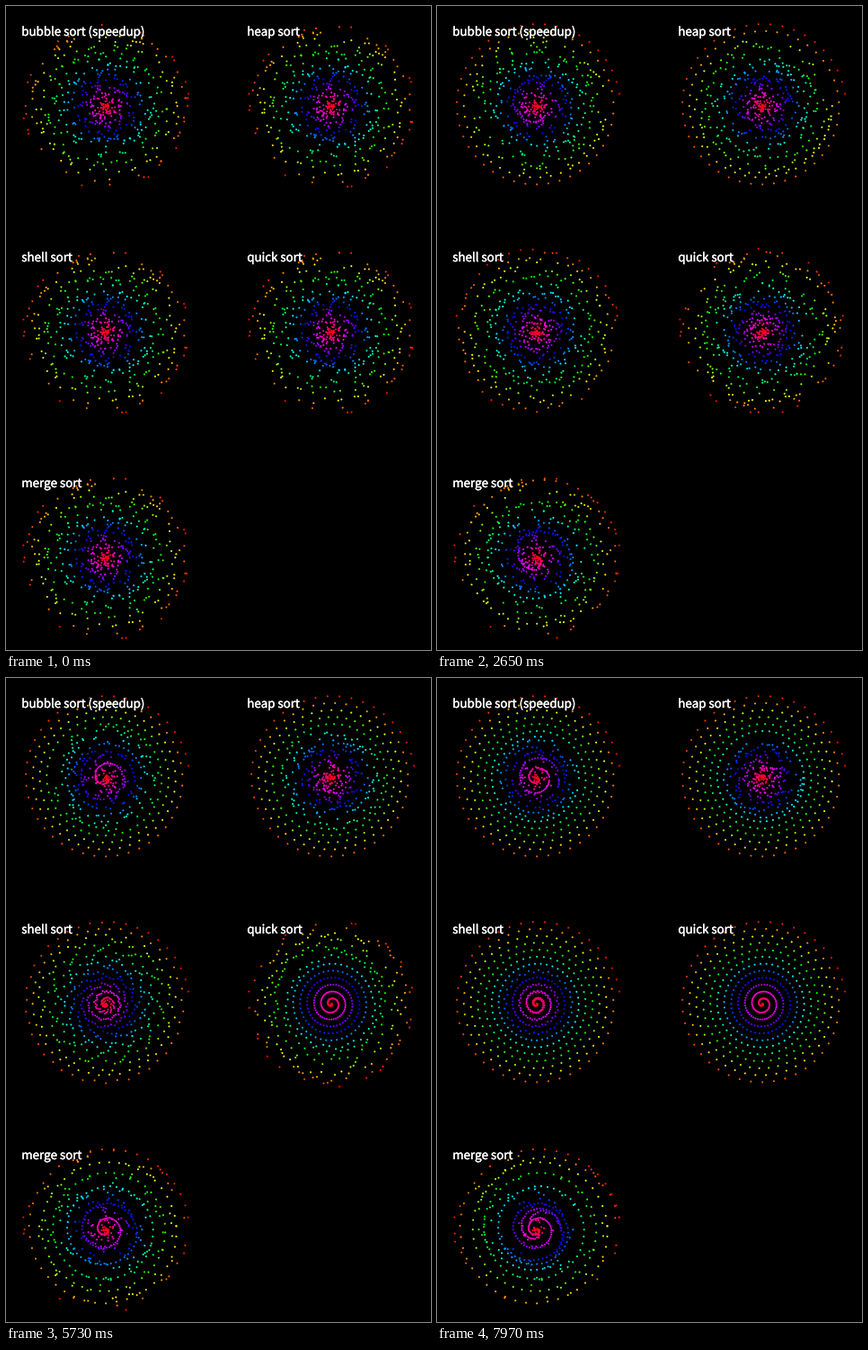
Write a matplotlib script that moves like this. It is 473 px wide and 716 px high and loops after 8000 ms.

```python
import math
import random

import matplotlib.patheffects as pe
import matplotlib.pyplot as plt
import numpy as np
from matplotlib.animation import FuncAnimation
from matplotlib.colors import hsv_to_rgb

W, H, DPI = 473, 716, 100
FRAMES, INTERVAL = 200, 40
STEPS = 113                # picture changes in one loop
N, TURNS = 512, 12
RADIUS = 93
SMALL = 20                 # quick sort finishes shorter runs at once


def bubble(a):
    for end in range(N - 1, 0, -1):
        for j in range(end):
            if a[j] > a[j + 1]:
                a[j], a[j + 1] = a[j + 1], a[j]
        yield


def heap(a):
    def sift(i, n):
        while 2 * i + 1 < n:
            c = 2 * i + 1
            if c + 1 < n and a[c + 1] > a[c]:
                c += 1
            if a[i] >= a[c]:
                return
            a[i], a[c] = a[c], a[i]
            i = c

    for i in range(N // 2 - 1, -1, -1):
        sift(i, N)
    for end in range(N - 1, 0, -1):
        a[0], a[end] = a[end], a[0]
        sift(0, end)
        yield


def shell(a):
    gap = N // 2
    while gap:
        for start in range(N - gap - 1, -1, -1):
            i = start
            yield
            while i + gap < N and a[i] > a[i + gap]:
                a[i], a[i + gap] = a[i + gap], a[i]
                i += gap
                yield
        gap //= 2


def quick(a, lo=0, hi=N - 1):
    if hi - lo < SMALL:
        a[lo:hi + 1] = sorted(a[lo:hi + 1])
        yield
        return
    pivot = (lo + hi) // 2     # values are ranks, so this is the median
    i, j = lo, hi
    while i <= j:
        while a[i] < pivot:
            i += 1
            yield
        while a[j] > pivot:
            j -= 1
            yield
        if i <= j:
            a[i], a[j] = a[j], a[i]
            i, j = i + 1, j - 1
            yield
    yield from quick(a, lo, j)
    yield from quick(a, i, hi)


def merge(a, lo=0, hi=N):
    if hi - lo < 2:
        return
    mid = (lo + hi) // 2
    yield from merge(a, lo, mid)
    yield from merge(a, mid, hi)
    for k, v in enumerate(sorted(a[lo:hi]), lo):
        a[k] = v
        yield


def record(sort, first, last):
    """States of one sort, from the first to the last fraction of its work."""
    a = list(shuffled)
    states = [np.array(a)]
    for _ in sort(a):
        states.append(np.array(a))
    states.append(np.array(a))
    top = len(states) - 1
    picks = np.linspace(first, last, STEPS + 1) * top
    return [states[min(top, int(p))] for p in picks]


random.seed(12)
shuffled = list(range(N))
random.shuffle(shuffled)

# title, sort, column, row, fraction of the work at the start and the end
PANELS = [
    ("bubble sort (speedup)", bubble, 0, 0, 0.005, 0.50),
    ("heap sort", heap, 1, 0, 0.0, 0.52),
    ("shell sort", shell, 0, 1, 0.0, 0.945),
    ("quick sort", quick, 1, 1, 0.0, 1.08),
    ("merge sort", merge, 0, 2, 0.0, 0.63),
]

fig = plt.figure(figsize=(W / DPI, H / DPI), dpi=DPI, facecolor="black")
ax = fig.add_axes([0, 0, 1, 1])
ax.set_xlim(0, W)
ax.set_ylim(H, 0)
ax.axis("off")

angle = np.arange(N) * 2 * math.pi * TURNS / N
ray = np.column_stack([np.cos(angle), np.sin(angle)])
hue = 1 - np.arange(N) / N
palette = hsv_to_rgb(np.column_stack([hue, np.ones(N), np.ones(N)]))

layers = []
for title, sort, col, row, first, last in PANELS:
    left, top = 251 * col, 251 * row
    dots = ax.scatter(np.zeros(N), np.zeros(N), s=(2.1 * 72 / DPI) ** 2,
                      linewidths=0)
    label = ax.text(left + 17.3, top + 33, title, color="white",
                    fontfamily="Noto Sans CJK JP", fontsize=13.3 * 72 / DPI,
                    va="baseline", zorder=5)
    label.set_path_effects([pe.withStroke(linewidth=0.25, foreground="white")])
    center = np.array([left + 111.2, top + 111.2])
    layers.append((dots, center, record(sort, first, last)))


def draw(frame):
    step = min(STEPS, max(0, int((frame * INTERVAL - 60) // 70)))
    for dots, center, states in layers:
        values = states[step]
        r = RADIUS * values / N
        dots.set_offsets(center + r[:, None] * ray)
        dots.set_facecolors(palette[values])
    return [layer[0] for layer in layers]


anim = FuncAnimation(fig, draw, frames=FRAMES, interval=INTERVAL,
                     init_func=lambda: draw(0), repeat=True, repeat_delay=0)
plt.show()
```
